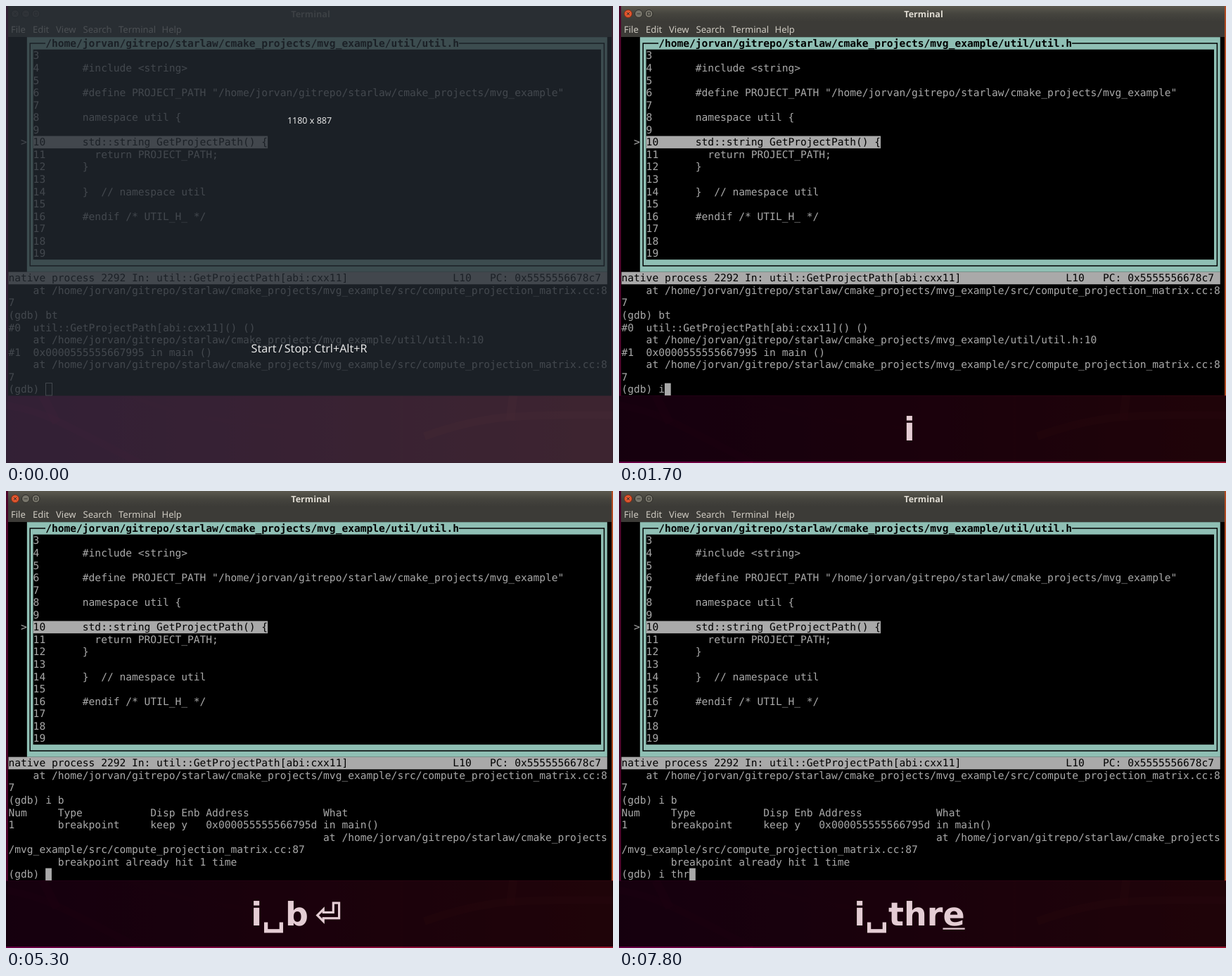
Recreate the animation shown at these times as an HTML page with a canvas. Size 863 px wide and 649 px high, loop 8000 ms.

```html
<!DOCTYPE html>
<html lang="en">
<head>
<meta charset="utf-8">
<title>Terminal</title>
<style>
  html, body { margin: 0; height: 100%; overflow: hidden; background: #000; }
  canvas { display: block; }
</style>
</head>
<body>
<canvas id="stage" width="863" height="649"></canvas>
<script>
const ctx = document.getElementById('stage').getContext('2d');
const W = 863, H = 649, LOOP = 8000;
const LEFT = 3.5, TOP = 44.2, COL = 8.776, ROW = 17.552;
const GRAY = '#a9a9a9', TEAL = '#8fbfb4', BAR = '#3c3b37';
const MONO = '14.58px "DejaVu Sans Mono", monospace';
const SANS = '"Noto Sans", "Open Sans", sans-serif';
const KEYS_FONT = 'bold 46px "DejaVu Sans", sans-serif';

const PROJECTS = '/home/jorvan/gitrepo/starlaw/cmake_projects';
const PROJECT = PROJECTS + '/mvg_example';
const MATRIX = '/src/compute_projection_matrix.cc:8';

const code = {
  4: '#include <string>',
  6: `#define PROJECT_PATH "${PROJECT}"`,
  8: 'namespace util {',
  10: 'std::string GetProjectPath() {',
  11: '  return PROJECT_PATH;',
  12: '}',
  14: '}  // namespace util',
  16: '#endif /* UTIL_H_ */'
};

const backtrace = [
  '    at ' + PROJECT + MATRIX,
  '7',
  '(gdb) bt',
  '#0  util::GetProjectPath[abi:cxx11]() ()',
  '    at ' + PROJECT + '/util/util.h:10',
  '#1  0x0000555555667995 in main ()',
  '    at ' + PROJECT + MATRIX,
  '7'
];
const breakpoints = [
  ...backtrace.slice(0, 2),
  '(gdb) i b',
  'Num     Type           Disp Enb Address            What',
  '1       breakpoint     keep y   0x000055555566795d in main()',
  ' '.repeat(51) + 'at ' + PROJECTS,
  '/mvg_example' + MATRIX + '7',
  '        breakpoint already hit 1 time'
];

// time, typed command, keys shown, last key underlined, cursor visible
const ENTERED = 'i␣b\u2009⏎';
const steps = [
  [0, '', '', 0, 1],
  [1400, '', '', 0, 0],
  [1700, 'i', 'i', 0, 1],
  [2000, 'i ', 'i', 0, 1],
  [2400, 'i ', 'i␣', 1, 0],
  [2600, 'i ', 'i␣b', 1, 1],
  [2800, 'i b', 'i␣b', 0, 1],
  [3200, 'i b', 'i␣b', 0, 0],
  [3800, 'i b', ENTERED, 1, 1],
  [4000, '', ENTERED, 1, 1],
  [4400, '', ENTERED, 0, 0],
  [5300, '', ENTERED, 0, 1],
  [5500, '', '', 0, 1],
  [5700, '', '', 0, 0],
  [6200, '', 'i', 1, 1],
  [6400, 'i', 'i', 0, 1],
  [6600, 'i', 'i␣', 1, 1],
  [6800, 'i ', 'i␣', 0, 1],
  [7100, 'i t', 'i␣t', 1, 1],
  [7300, 'i t', 'i␣t', 0, 1],
  [7500, 'i t', 'i␣th', 1, 1],
  [7700, 'i th', 'i␣thr', 1, 1],
  [7800, 'i thr', 'i␣thre', 1, 1]
];

const colX = col => LEFT + col * COL;
const rowY = row => TOP + row * ROW;

function rect(x, y, w, h, fill) {
  ctx.fillStyle = fill;
  ctx.fillRect(x, y, w, h);
}

function cells(col, row, cols, rows, fill) {
  rect(colX(col), rowY(row), cols * COL, rows * ROW, fill);
}

function mono(text, col, row, fill = GRAY, weight = '') {
  ctx.font = weight + MONO;
  ctx.textAlign = 'left';
  ctx.fillStyle = fill;
  [...text].forEach((c, i) => ctx.fillText(c, colX(col + i), rowY(row) + 13.7));
}

function label(text, x, y, font, fill, align = 'center') {
  ctx.font = font;
  ctx.textAlign = align;
  ctx.fillStyle = fill;
  ctx.fillText(text, x, y);
}

function stroke(path, color, width) {
  ctx.strokeStyle = color;
  ctx.lineWidth = width;
  ctx.stroke(new Path2D(path));
}

function gradient(x, y, ...colors) {
  const g = ctx.createLinearGradient(0, 0, x, y);
  colors.forEach((c, i) => g.addColorStop(i / (colors.length - 1), c));
  return g;
}

function wallpaper() {
  rect(0, 0, W, H, gradient(W, 0, '#650043', '#7e0638', '#95122b'));
  stroke('M0 567Q40 574 70 588T190 649', '#8a004c55', 10);
  stroke('M52 553L72 592', '#8a004c66', 12);
  stroke('M175 553Q260 590 420 600', '#8a0a4022', 6);
  stroke('M562 553V649', '#a0183322', 4);
  stroke('M595 611Q660 588 712 584T863 581', '#ad203a77', 11);
  stroke('M721 553L717 588', '#ad203a77', 12);
}

function button(x, fill, edge) {
  ctx.beginPath();
  ctx.arc(x, 11, 5.5, 0, 7);
  ctx.fillStyle = fill;
  ctx.fill();
  ctx.strokeStyle = edge;
  ctx.lineWidth = 1;
  ctx.stroke();
}

function titleBar(active) {
  rect(3, 0, 858, 22, active ? gradient(0, 22, '#5b594f', '#45443e', BAR) : BAR);
  button(13, active ? '#e2572f' : '#55534c', active ? '#7c2b15' : '#2b2a27');
  for (const x of [28, 42.5]) button(x, active ? '#77756b' : '#55534c', '#2b2a27');
  stroke('M11 9L15 13M15 9L11 13M25.5 11H30.5M40.5 9H44.5V13H40.5Z', '#33322e', 1);
  label('Terminal', 433, 16, 'bold 12.6px ' + SANS, active ? '#dfdbd2' : '#8d8a82');
}

function sourcePane() {
  cells(3, 0, 94, 19, TEAL);
  rect(colX(4), rowY(1), 92 * COL, 17 * ROW, '#000');
  stroke('M56 53H34.2V369H850.4V53H644', '#000', 1.5);
  mono(PROJECT + '/util/util.h', 6, 0, '#000', 'bold ');
  cells(4, 8, 38, 1, GRAY);
  mono('>', 2, 8);
  for (let line = 3; line <= 19; line++) {
    const color = line === 10 ? '#000' : GRAY;
    mono(String(line), 4, line - 2, color);
    mono(code[line] || '', 12, line - 2, color);
  }
  cells(0, 19, 97, 1, GRAY);
  mono('native process 2292 In: util::GetProjectPath[abi:cxx11]', 0, 19, '#000');
  mono('L10   PC: 0x5555556678c7', 72, 19, '#000');
}

function commandPane(t, typed, cursorOn) {
  (t < 4000 ? backtrace : breakpoints).forEach((s, i) => mono(s, 0, 20 + i));
  mono('(gdb) ' + typed, 0, 28);
  const col = 6 + typed.length;
  if (t < 800) {
    ctx.strokeStyle = GRAY;
    ctx.lineWidth = 1;
    ctx.strokeRect(56.5, 535.5, 9, 17.5);
  } else if (cursorOn) {
    cells(col, 28, 1, 1, GRAY);
  }
}

function keyOverlay(keys, underlined) {
  rect(0, 553.5, W, 93.5, 'rgba(0,0,0,.79)');
  ctx.font = KEYS_FONT;
  const right = 413 + ctx.measureText(keys).width / 2;
  const last = ctx.measureText(keys.slice(-1)).width;
  label(keys, 413, 617, KEYS_FONT, '#e4cdd4');
  if (underlined) rect(right - last, 620.5, last, 2.2, '#e4cdd4');
}

function draw(t) {
  const [, typed, keys, underlined, cursorOn] = steps.findLast(s => s[0] <= t);
  const focus = Math.max(0, Math.min(1, (Math.floor(t / 100) - 5) / 3));
  ctx.textRendering = 'geometricPrecision';

  wallpaper();
  ctx.globalAlpha = focus;
  rect(0, 0, 3, 553, '#4c0429');
  rect(861, 0, 2, 553, '#b04a22');
  ctx.globalAlpha = 1;

  rect(3, 0, 858, 553.5, '#000');
  titleBar(false);
  ctx.globalAlpha = focus;
  titleBar(true);
  ctx.globalAlpha = 1;
  rect(3, 22, 858, 22, BAR);
  const menu = { File: 7, Edit: 38, View: 71, Search: 109.5, Terminal: 160, Help: 221.5 };
  for (const name in menu) label(name, menu[name], 38, '13px ' + SANS, '#cfcbc2', 'left');

  sourcePane();
  commandPane(t, typed, cursorOn);
  if (keys) keyOverlay(keys, underlined);

  if (t < 100) {
    rect(0, 0, W, H, 'rgba(36,42,50,.77)');
    label('1180 x 887', 431.5, 166.5, '12.5px ' + SANS, '#e6e6e6');
    label('Start\u2006/\u2006Stop: Ctrl+Alt+R', 431, 492, '16px ' + SANS, '#e6e6e6');
  }
}

function tick() {
  draw(performance.now() % LOOP);
  requestAnimationFrame(tick);
}
tick();
</script>
</body>
</html>
```
